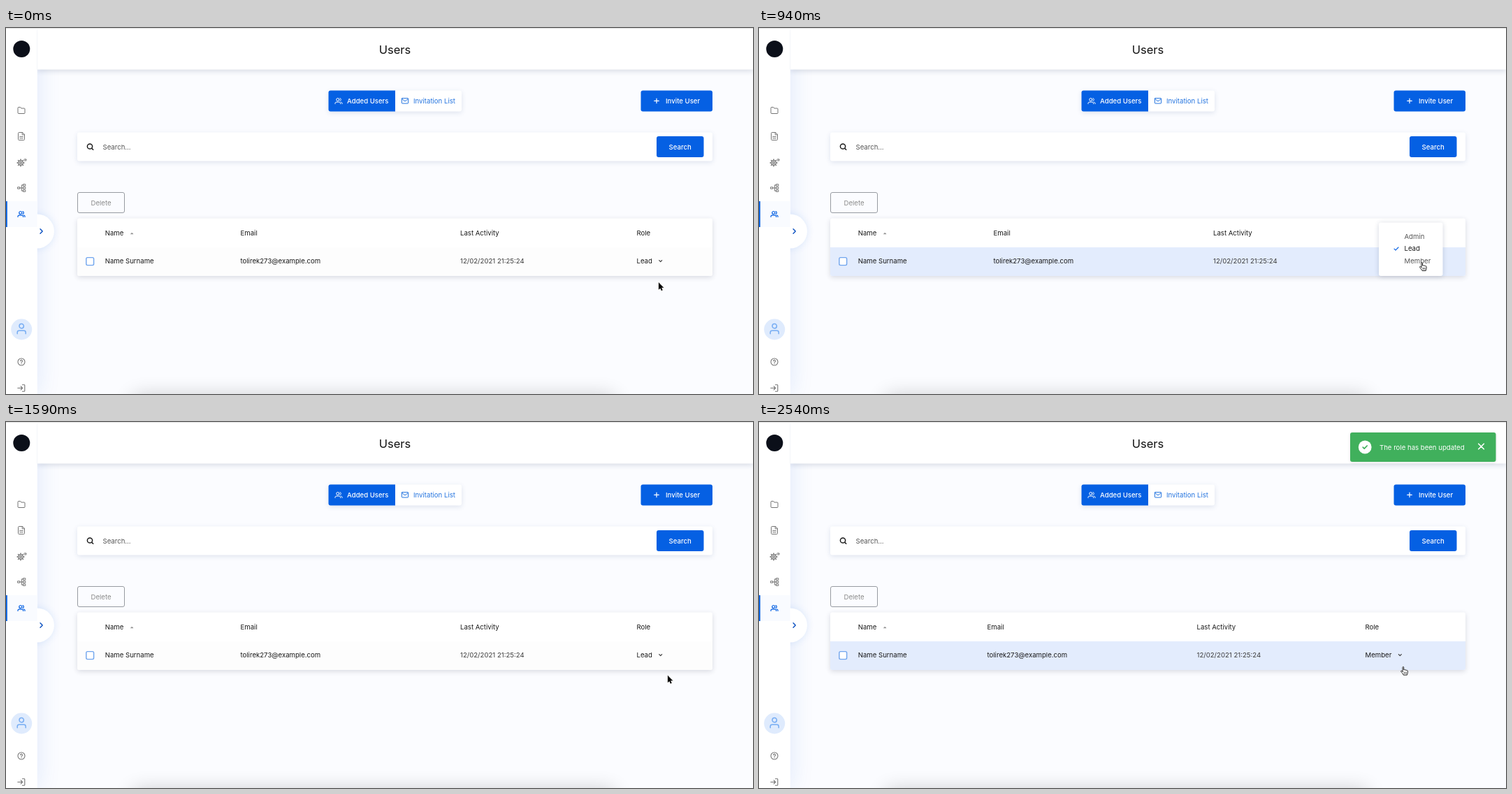
An HTML page with a canvas for the animation above (2590 ms loop, 1069 px wide and 524 px high).

```html
<!DOCTYPE html>
<html lang="en">
<head>
<meta charset="utf-8">
<title>Users</title>
<style>
html, body { margin: 0; width: 100%; height: 100%; overflow: hidden; background: #fbfcff; }
canvas { display: block; }
</style>
</head>
<body>
<canvas id="stage" width="1069" height="524"></canvas>
<script>
const ctx = document.getElementById('stage').getContext('2d');
const LOOP = 2590;
const BLUE = '#0560e3', INK = '#191919', GREY = '#757575';

// Pointer hotspot over time: [ms, x, y]
const POINTER = [
  [0, 934, 364.5], [40, 934, 355.5], [90, 933.6, 341.8], [140, 932.6, 337.4],
  [190, 932, 335.2], [290, 931.8, 334.3], [640, 931.8, 334.3], [690, 940.5, 335],
  [840, 940.5, 335], [890, 945, 335.3], [940, 948.6, 335.8], [1490, 948.6, 335.8],
  [1540, 948.6, 352.8], [1590, 947, 363], [1640, 945, 378], [1690, 942.5, 394],
  [1740, 941.3, 403], [1790, 941, 405.5], [2390, 941, 405], [2540, 921.8, 350.5],
  [LOOP, 921.8, 350.5]
];

function text(str, x, y, color = INK, { size = 9.6, weight = 400, align = 'left' } = {}) {
  ctx.font = `${weight} ${size}px Inter, sans-serif`;
  ctx.textAlign = align;
  ctx.fillStyle = color;
  ctx.fillText(str, x, y);
}

function box(x, y, w, h, fill, radius = 0, shadow) {
  ctx.save();
  if (shadow) [ctx.shadowColor, ctx.shadowBlur, ctx.shadowOffsetY] = shadow;
  ctx.fillStyle = fill;
  ctx.beginPath();
  ctx.roundRect(x, y, w, h, radius);
  ctx.fill();
  ctx.restore();
}

function disc(x, y, r, fill) {
  ctx.fillStyle = fill;
  ctx.beginPath();
  ctx.arc(x, y, r, 0, Math.PI * 2);
  ctx.fill();
}

// Strokes a path given relative to (x, y)
function line(path, x, y, color, width = 1, fill) {
  ctx.save();
  ctx.translate(x, y);
  ctx.lineCap = ctx.lineJoin = 'round';
  ctx.lineWidth = width;
  ctx.strokeStyle = color;
  const shape = new Path2D(path);
  if (fill) {
    ctx.fillStyle = fill;
    ctx.fill(shape);
  }
  ctx.stroke(shape);
  ctx.restore();
}

const ring = (x, y, r) => `M${x + r} ${y}A${r} ${r} 0 1 1 ${x - r} ${y}A${r} ${r} 0 1 1 ${x + r} ${y}Z`;

const ICON = {
  folder: 'M-5 -3.6Q-5 -4.6 -4 -4.6H-1.4L-.2 -3H4Q5 -3 5 -2V3.5Q5 4.5 4 4.5H-4Q-5 4.5 -5 3.5Z',
  file: 'M1.2 -5.5H-3.5Q-4.5 -5.5 -4.5 -4.5V4.5Q-4.5 5.5 -3.5 5.5H3.5Q4.5 5.5 4.5 4.5V-2.2ZV-2.2H4.5M-2.3 .4H2.3M-2.3 2.8H2.3',
  tree: 'M-5.5 -1.2H-2.8V1.2H-5.5ZM2.3 -5.3H5.3V-2.9H2.3ZM2.3 -1.2H5.3V1.2H2.3ZM2.3 2.9H5.3V5.3H2.3ZM-2.8 0H2.3M2.3 -4.1H-.2V4.1H2.3',
  users: ring(-1.2, -2, 2) + 'M-5 4V3.2Q-5 1.6 -3.2 1.6H.8Q2.6 1.6 2.6 3.2V4M2 -3.9A2 2 0 0 1 2 -.1M3.6 1.7Q5 2 5 3.3V4',
  person: ring(0, -4, 3.2) + 'M-6 7V5Q-6 2.4 -3.4 2.4H3.4Q6 2.4 6 5V7',
  help: ring(0, 0, 5) + 'M-1.5 -1.2C-1.5 -3.2 1.6 -3 1.5 -1.1C1.5 0 0 0 0 1M0 2.6V2.7',
  exit: 'M1.4 -4.8H3.9Q4.8 -4.8 4.8 -3.9V3.9Q4.8 4.8 3.9 4.8H1.4M-5.2 0H1.6M-.8 -2.5L1.6 0L-.8 2.5',
  mail: 'M-4 -3.7H4Q4.6 -3.7 4.6 -3V3Q4.6 3.7 4 3.7H-4Q-4.6 3.7 -4.6 3V-3Q-4.6 -3.7 -4 -3.7ZM-4.4 -2.8L0 .6L4.4 -2.8',
  search: ring(-.5, -.5, 3.6) + 'M2.2 2.2L4.2 4.2',
  plus: 'M-3.3 0H3.3M0 -3.3V3.3',
  check: 'M-3 .2L-1 2.2L3 -2',
  cross: 'M-3.8 -3.8L3.8 3.8M3.8 -3.8L-3.8 3.8',
  down: 'M-2 -1L0 1L2 -1',
  next: 'M-1.6 -3.2L1.6 0L-1.6 3.2',
  arrow: 'M0 0V10L2.3 7.9L3.9 11.5L5.6 10.8L4 7.3H7.1Z',
  hand: 'M-.8 .7C-.8 -.5 .9 -.5 .9 .7V4.4C1.2 3.6 2.8 3.7 2.8 4.8C3.2 4 4.6 4.2 4.7 5.2C5.2 4.6 6.5 4.9 6.5 6.2V8.2C6.5 9.8 5.6 10.2 5.6 11.7H.4C.2 10.2 -2.3 8.2 -3 6.8C-3.5 5.8 -2.4 5.2 -1.7 6L-.8 7Z',
  knuckles: 'M1.3 7.6V9.8M2.9 7.6V9.8M4.5 7.6V9.8'
};

function gear(x, y, r, teeth) {
  line(ring(0, 0, r * .68) + ring(0, 0, r * .28), x, y, GREY, r * .24);
  for (let i = 0; i < teeth; i++) {
    const a = i / teeth * Math.PI * 2, c = Math.cos(a) * r, s = Math.sin(a) * r;
    line(`M${c * .75} ${s * .75}L${c} ${s}`, x, y, GREY, r * .28);
  }
}

function drawFrame() {
  box(0, 0, 1069, 524, '#fbfcff');
  box(0, 0, 44.5, 524, '#fff', 0, ['rgba(20,95,220,.13)', 34, 0]);
  box(180, 526, 692, 30, '#ddd', 12, ['rgba(0,0,0,.2)', 28, 0]);
  box(45, 0, 1024, 59.5, '#fff', 0, ['rgba(30,50,90,.15)', 7, 2]);
  box(20, 266.5, 49, 49, '#fff', 24.5, ['rgba(20,95,220,.12)', 12, 0]);
  box(0, 0, 44.5, 524, '#fff');
  box(0, 0, 1069, 1, '#e3e3e3');
  text('Users', 556.5, 36.5, '#111', { size: 16.5, align: 'center' });
}

function drawSidebar() {
  disc(22.3, 30, 12, '#0b0f19');
  line(ICON.folder, 22, 118, GREY);
  line(ICON.file, 22, 155, GREY);
  gear(21, 193, 5, 8);
  gear(27.6, 188.8, 2, 6);
  line(ICON.tree, 22.5, 229, GREY);
  box(0, 248, 44.5, 37, '#f9fbff');
  box(0, 248, 1.8, 37, BLUE);
  line(ICON.users, 22, 266.5, BLUE, 1.2);
  line(ICON.next, 50.6, 291, '#0a4fc0', 1.4);
  disc(22.2, 431.5, 15, '#dfebfd');
  line(ICON.person, 22.2, 430.8, '#77adf3', 1.5);
  line(ICON.help, 22, 478, GREY, 1.1);
  line(ICON.exit, 22, 515.5, GREY, 1.1);
}

function drawControls() {
  const soft = ['rgba(30,60,120,.13)', 7, 2];
  const bold = { weight: 500 };
  box(461.5, 89.5, 190.5, 30, '#fff', 3, soft);
  box(461.5, 89.5, 95.5, 30, BLUE, [3, 0, 0, 3]);
  line(ICON.users, 476, 104.5, '#fff');
  text('Added Users', 488, 108.2, '#fff', bold);
  line(ICON.mail, 571, 104.3, '#2474df');
  text('Invitation List', 583, 108.2, '#2474df');

  box(908.5, 89.5, 102.5, 30, BLUE, 3);
  line(ICON.plus, 931, 104.3, '#fff', 1.2);
  text('Invite User', 944, 108.2, '#fff', bold);

  box(102, 149.5, 909, 41, '#fff', 3, soft);
  line(ICON.search, 120.5, 170, INK, 1.5);
  text('Search...', 138.5, 173.5, '#555');
  box(931, 155, 67.5, 30, BLUE, 3);
  text('Search', 964.7, 173.6, '#fff', { weight: 500, align: 'center' });

  ctx.strokeStyle = '#979ba1';
  ctx.lineWidth = 1;
  ctx.beginPath();
  ctx.roundRect(102.5, 235.5, 67, 29, 2.5);
  ctx.stroke();
  text('Delete', 136, 254, '#8b8b8b', { align: 'center' });
}

function drawTable(hover, updated) {
  const [email, activity, role] = updated ? [326.5, 626.5, 867.5] : [335.5, 650, 902.5];
  box(102, 272.5, 909, 82.5, '#fff', 3, ['rgba(30,40,70,.16)', 7, 2]);
  box(102, 314, 909, 41, hover ? '#e3ecfd' : '#fdfdfd', [0, 0, 3, 3]);

  text('Name', 141.7, 296.5);
  line('M-1.8 .9H1.8L0 -1Z', 180.3, 294.2, '#888', .4, '#888');
  text('Email', email, 296.5);
  text('Last Activity', activity, 296.5);
  text('Role', role, 296.5);

  box(114.6, 328.5, 11.2, 11.2, '#fff', 2.2);
  ctx.strokeStyle = '#70a5ee';
  ctx.lineWidth = 1.4;
  ctx.stroke(new Path2D('M116.6 328.6H123.8Q125.6 328.6 125.6 330.4V337.8Q125.6 339.6 123.8 339.6H116.6Q114.8 339.6 114.8 337.8V330.4Q114.8 328.6 116.6 328.6Z'));
  text('Name Surname', 141.7, 337.2);
  text('tolirek273@example.com', email, 337.2);
  text('12/02/2021 21:25:24', activity, 337.2, '#3d3d3d');
  text(updated ? 'Member' : 'Lead', role, 337.2);
  line(ICON.down, updated ? 917.3 : 936.7, 333.7, '#333', 1.1);
}

function drawMenu() {
  box(887, 278.5, 91.5, 76.5, '#fff', 3, ['rgba(30,50,90,.2)', 7, 1]);
  text('Admin', 923.5, 301.5, '#555');
  line(ICON.check, 912, 316, BLUE, 1.1);
  text('Lead', 923.5, 319.4);
  text('Member', 923.5, 337.3, '#555');
}

function drawToast() {
  box(846, 15, 208.5, 42, '#40b05c', 3, ['rgba(0,0,0,.1)', 4, 1]);
  disc(867.2, 36, 9.4, '#fff');
  line(ICON.check, 867.2, 36, '#40b05c', 1.7);
  text('The role has been updated', 888, 40, '#fff');
  line(ICON.cross, 1033.5, 35, '#fff', 1.6);
}

function drawPointer(x, y, hand) {
  if (hand) {
    line(ICON.hand, x, y, '#222', 1, '#fff');
    line(ICON.knuckles, x, y, '#333', .7);
  } else {
    line(ICON.arrow, x, y, '#fff', 1.8, '#fff');
    line(ICON.arrow, x, y, '#000', .2, '#000');
  }
}

function pointerAt(t) {
  const i = Math.max(1, POINTER.findIndex(key => key[0] > t));
  const [t0, x0, y0] = POINTER[i - 1], [t1, x1, y1] = POINTER[i];
  const k = (t - t0) / (t1 - t0);
  return [x0 + (x1 - x0) * k, y0 + (y1 - y0) * k];
}

function render(now) {
  const t = Math.max(0, Math.floor((now % LOOP + 10) / 50) * 50 - 10);
  const [x, y] = pointerAt(t);
  const hover = y > 314 && y < 355;
  const updated = t >= 1690;
  drawFrame();
  drawSidebar();
  drawControls();
  drawTable(hover, updated);
  if (t >= 440 && t < 1090) drawMenu();
  if (updated) drawToast();
  drawPointer(x, y, hover);
}

const start = performance.now();
function tick() {
  render(performance.now() - start);
  requestAnimationFrame(tick);
}
tick();
</script>
</body>
</html>
```
